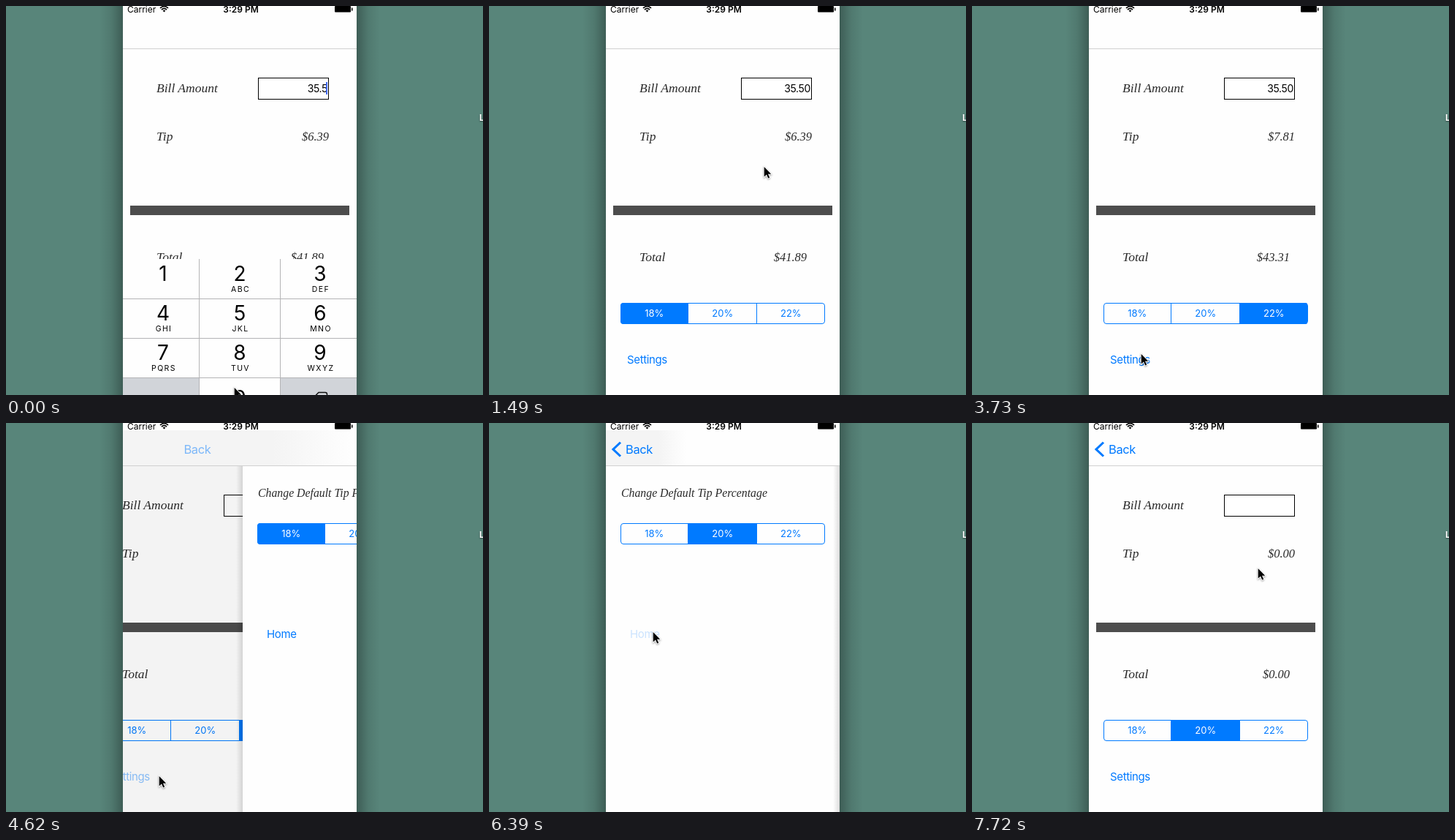
An HTML page for the animation above (8000 ms loop, 653x532 px).

```html
<!DOCTYPE html>
<html lang="en">
<head>
<meta charset="utf-8">
<title>Tip calculator</title>
<style>
  html, body { margin: 0; width: 100%; height: 100%; overflow: hidden; background: #58857a; }
  svg { display: block; width: 653px; height: 532px; }
  text { font-family: Inter, Roboto, "Liberation Sans", sans-serif; letter-spacing: -.024em; }
  .script { font-family: "Liberation Serif", "Noto Serif", serif; font-style: italic; letter-spacing: 0; fill: #2a2a2a; }
  .plain { letter-spacing: 0; }
  .letters { letter-spacing: 1.4px; }
  .blue { fill: #007aff; }
  .end { text-anchor: end; }
  .mid { text-anchor: middle; }
</style>
</head>
<body>
<svg id="stage" viewBox="0 0 653 532"></svg>
<script>
const LOOP = 8000;
const TICK = 148.4; // the picture steps once per tick; all times below are in ticks
const BLUE = '#007aff';
const PAPER = '#fefefe';

const SETTINGS_TAP = 30, HOME_TAP = 43;

// Pointer moves, each eased from wherever the last one ended
const REST = { x: 312, y: 521 };
const MOVES = [
  { from: 3, to: 8, x: 386, y: 182 },
  { from: 9, to: 13, x: 322, y: 416 },
  { from: 16, to: 19, x: 416, y: 417 },
  { from: 21, to: 26, x: 209, y: 482 },
  { from: 31, to: 35, x: 321, y: 149 },
  { from: 37, to: 41, x: 224, y: 285 },
  { from: 43, to: 46, x: 405, y: 209 },
  { from: 50, to: 52, x: 391, y: 198 }
];

const text = (x, y, size, str, cls = '', more = '') =>
  `<text x="${x}" y="${y}" font-size="${size}" class="${cls}" ${more}>${str}</text>`;
const rect = (x, y, w, h, fill, more = '') =>
  `<rect x="${x}" y="${y}" width="${w}" height="${h}" fill="${fill}" ${more}/>`;

function segments(id, y) {
  const choices = ['18%', '20%', '22%'];
  const fills = choices.map((_, i) =>
    rect(93 * i, 0, 93, 29, BLUE, `id="${id}Fill${i}" clip-path="url(#pill)"`)).join('');
  const labels = choices.map((str, i) =>
    text(46.3 + 93.5 * i, 19, 13, str, 'mid plain', `id="${id}Label${i}"`)).join('');
  return `<g transform="translate(180 ${y})">${fills}
    <rect x=".5" y=".5" width="279" height="28" rx="3.5" fill="none" stroke="${BLUE}"/>
    <path d="M92.5 0V29M186.5 0V29" stroke="${BLUE}"/>${labels}</g>`;
}

function keypad(id) {
  const letters = ['', 'ABC', 'DEF', 'GHI', 'JKL', 'MNO', 'PQRS', 'TUV', 'WXYZ'];
  const keys = letters.map((str, i) => {
    const x = [215, 320, 430][i % 3], y = 376 + 54 * Math.floor(i / 3);
    return text(x, y, 28, i + 1, 'mid plain') + text(x + 1, y + 15, 10.5, str, 'mid letters');
  }).join('');
  return `<g id="${id}Keys">${rect(160, 346, 320, 216, PAPER)}
    ${rect(160, 509, 104, 53, '#d1d4d9')}${rect(376, 509, 104, 53, '#d1d4d9')}
    ${rect(265, 509, 110, 53, '#d1d4d9', `id="${id}Zero"`)}
    <path d="M160 400.5H480M160 454.5H480M160 508.5H480M264.5 346V562M375.5 346V562" stroke="#b4b4b6"/>
    ${keys}${text(320, 546, 28, '0', 'mid plain')}
    <path d="M428 528.5H437Q439.5 528.5 439.5 531V542Q439.5 544.5 437 544.5H428L420 536.5Z"
      fill="none" stroke="#111" stroke-width="1.5"/></g>`;
}

const page = (id, body) => `<g id="${id}">
  ${rect(151, 58, 9, 474, 'url(#edge)')}${rect(160, 58, 320, 474, PAPER)}${body}
  ${rect(160, 58, 320, 474, '#000', `id="${id}Dim"`)}</g>`;

const billPage = id => page(id, `
  ${text(206, 118, 17.5, 'Bill Amount', 'script')}
  <rect x="345.5" y="98.5" width="96" height="29" fill="#fff" stroke="#000"/>
  ${text(440, 118, 14, '', 'end', `id="${id}Bill"`)}
  ${rect(438, 104, 2, 17, '#426bf2', `id="${id}Caret"`)}
  ${text(206, 184, 17.5, 'Tip', 'script')}
  ${text(442, 184, 16.5, '', 'script end', `id="${id}Tip"`)}
  ${rect(170, 273, 300, 13, '#4d4d4d')}
  ${text(206, 349, 17.5, 'Total', 'script')}
  ${text(435, 349, 16.5, '', 'script end', `id="${id}Total"`)}
  ${segments(id, 406)}
  ${text(189, 489, 15, 'Settings', 'blue', `id="${id}Link"`)}
  ${keypad(id)}`);

const prefsPage = page('prefs', `
  ${text(181, 101, 15.8, 'Change Default Tip Percentage', 'script')}
  ${segments('prefs', 137)}
  ${text(193, 294, 15, 'Home', 'blue', 'id="prefsLink"')}`);

const statusBar = `${text(166, 8.5, 12, 'Carrier', 'plain')}
  ${text(321.5, 8.5, 12, '3:29 PM', 'mid plain', 'font-weight="600"')}
  <path d="M211 2.9Q216.5 -2 222 2.9M213 5Q216.5 1.9 220 5" fill="none" stroke="#000" stroke-width="1.7"/>
  <path d="M214.6 6.3Q216.5 4.9 218.4 6.3L216.5 8.4Z"/>
  ${rect(450, 0, 22, 8.5, '#000', 'rx="1"')}${rect(473, 2.5, 1.5, 4, '#000')}`;

document.getElementById('stage').innerHTML = `
  <defs>
    <clipPath id="pill"><rect width="280" height="29" rx="4"/></clipPath>
    <clipPath id="phone"><rect x="160" width="320" height="532"/></clipPath>
    <linearGradient id="edge"><stop stop-opacity="0"/><stop offset="1" stop-opacity=".13"/></linearGradient>
    <linearGradient id="haze">
      <stop offset=".65" stop-color="#f4f4f4"/><stop offset="1" stop-color="#f4f4f4" stop-opacity="0"/>
    </linearGradient>
    <linearGradient id="left">
      <stop stop-opacity="0"/><stop offset=".5" stop-opacity=".09"/><stop offset="1" stop-opacity=".3"/>
    </linearGradient>
    <linearGradient id="right" href="#left" x1="1" x2="0"/>
  </defs>
  ${rect(0, 0, 653, 532, '#58857a')}
  ${rect(128, 0, 32, 532, 'url(#left)')}${rect(480, 0, 32, 532, 'url(#right)')}
  ${text(648, 157, 12, 'L', 'plain', 'fill="#fff" font-weight="700" style="text-shadow:0 1px 2px #0008"')}
  <g clip-path="url(#phone)">
    ${billPage('first')}${prefsPage}${billPage('second')}
    ${rect(160, 0, 320, 58, PAPER)}
    ${rect(160, 10, 0, 48, 'url(#haze)', 'id="navHaze"')}
    ${rect(160, 58, 320, 1, '#d0d0d0')}
    <path id="chevron" d="M180 26.5L170 36L180 45.5" fill="none" stroke="${BLUE}" stroke-width="3.1"/>
    ${text(187, 42, 16.5, 'Back', 'blue', 'id="backOld"')}
    ${text(187, 42, 16.5, 'Back', 'blue', 'id="backNew"')}
    ${statusBar}
  </g>
  <path id="pointer" d="M.7 1V14.6L4 11.6L6.2 16.6L8.2 15.7L6 10.8H10.2Z" stroke="#fff" stroke-width="1.6"
    paint-order="stroke" style="filter:drop-shadow(0 1px 1px #0006)"/>`;

const el = {};
document.querySelectorAll('[id]').forEach(node => { el[node.id] = node; });
const set = (id, name, value) => el[id].setAttribute(name, value);
const show = (id, on) => set(id, 'visibility', on ? 'inherit' : 'hidden');
const shift = (id, x, y = 0) => set(id, 'transform', `translate(${Math.round(x)} ${Math.round(y)})`);
const clamp = v => Math.max(0, Math.min(1, v));
const mix = (a, b, u) => a + (b - a) * u;
const smooth = u => u * u * (3 - 2 * u);

// Critically damped spring used by the page pushes
function spring(tick, start) {
  const u = Math.max(0, tick - start) * 2.53;
  return 1 - Math.exp(-u) * (1 + u);
}

function pointerAt(tick) {
  return MOVES.reduce((p, m) => {
    const u = smooth(clamp((tick - m.from) / (m.to - m.from)));
    return { x: mix(p.x, m.x, u), y: mix(p.y, m.y, u) };
  }, REST);
}

function choose(id, pick) {
  for (let i = 0; i < 3; i++) {
    show(`${id}Fill${i}`, i === pick);
    set(`${id}Label${i}`, 'fill', i === pick ? '#fff' : BLUE);
  }
}

function fillBill(id, bill, pick, caret, keysDown) {
  const amount = Number(bill), tip = amount * (.18 + .02 * pick);
  el[id + 'Bill'].textContent = bill;
  el[id + 'Tip'].textContent = '$' + tip.toFixed(2);
  el[id + 'Total'].textContent = '$' + (amount + tip).toFixed(2);
  choose(id, pick);
  show(id + 'Caret', caret);
  shift(id + 'Keys', 0, 220 * keysDown);
}

function draw(time) {
  const k = Math.floor(time / TICK);
  const push1 = spring(k, SETTINGS_TAP + .353), push2 = spring(k, HOME_TAP - .01);

  const pick = k < 16 ? 0 : k < 21 ? 1 : 2;
  fillBill('first', k < 2 ? '35.5' : '35.50', pick, k < 8, clamp((k - 8) / 2));
  fillBill('second', '', 1, k < 49, clamp((k - 48) / 2));
  choose('prefs', k < 37 ? 0 : 1);
  show('firstZero', k === 1 || k === 2);
  show('secondZero', false);

  shift('first', -96 * push1);
  shift('prefs', 320 * (1 - push1) - 96 * push2);
  shift('second', 320 * (1 - push2));
  show('prefs', k >= SETTINGS_TAP);
  show('second', k >= HOME_TAP);
  set('firstDim', 'opacity', .09 * push1);
  set('prefsDim', 'opacity', .09 * push2);
  set('secondDim', 'opacity', 0);
  set('firstLink', 'opacity', k < SETTINGS_TAP ? 1 : mix(.2, .7, push1));
  set('prefsLink', 'opacity', k < HOME_TAP ? 1 : .2);

  set('navHaze', 'width', mix(510, 110, push1));
  set('navHaze', 'opacity', clamp(push1 * 2.2) * (1 - push2));
  set('chevron', 'opacity', clamp(push1 * 2 - 1));
  set('backOld', 'x', 187 + 110 * (1 - push1) - 40 * push2);
  set('backOld', 'opacity', push1 * (1 - push2));
  set('backNew', 'x', 187 + 110 * (1 - push2));
  set('backNew', 'opacity', push2);
  const { x, y } = pointerAt(k);
  shift('pointer', x, y);
}

const begin = performance.now();
function frame() {
  draw((performance.now() - begin) % LOOP);
  requestAnimationFrame(frame);
}
frame();
</script>
</body>
</html>
```
